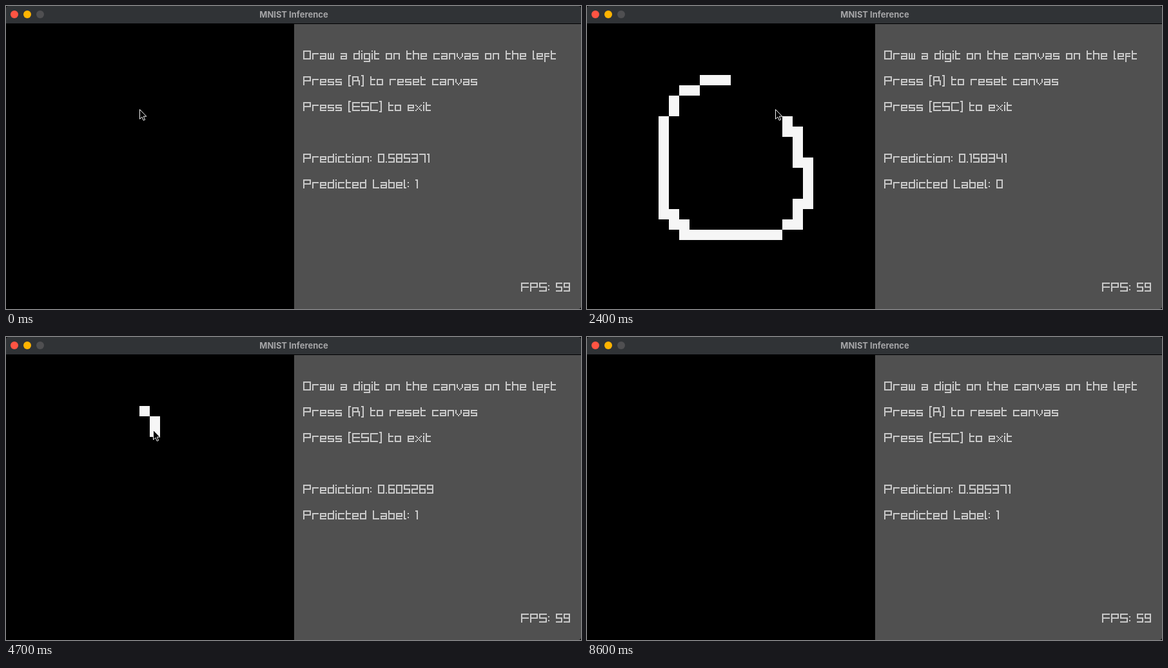
An HTML page for the animation above (8700 ms loop, 892x470 px).

```html
<!DOCTYPE html>
<html lang="en">
<head>
<meta charset="utf-8">
<title>MNIST Inference</title>
<style>
  html, body { margin: 0; width: 100%; height: 100%; overflow: hidden; background: #000; }
  svg { display: block; }
  .title { font: 700 13px Inter, sans-serif; fill: #a6a6a8; text-anchor: middle; }
  .pixels { fill: none; stroke: #c8c8c8; stroke-linecap: square; shape-rendering: crispEdges; }
  .label { font: 20px "DejaVu Sans Mono", monospace; fill: transparent; }
</style>
</head>
<body>
<svg width="892" height="470" viewBox="0 0 892 470">
  <clipPath id="frame"><rect width="892" height="470" rx="4"/></clipPath>
  <g clip-path="url(#frame)">
    <rect width="892" height="27" fill="#303336"/>
    <rect x="447" y="28" width="445" height="442" fill="#505050"/>
    <circle cx="13" cy="13" r="6" fill="#ff5443"/>
    <circle cx="33" cy="13" r="6" fill="#ffb400"/>
    <circle cx="53" cy="13" r="6" fill="#4f4f51"/>
    <text class="title" x="446.5" y="17.5">MNIST Inference</text>
    <path id="ink" fill="#f6f6f6" shape-rendering="crispEdges"/>
    <g id="panel"></g>
    <path id="cursor" d="M.5 .5V15.3L3.9 12.1L6.2 17.4L8.6 16.4L6.3 11.2H10.8Z"
          fill="#000" stroke="#f6f6f6"/>
  </g>
</svg>
<script>
const LOOP = 8700, STEP = 100, CELL = 16;
const $ = id => document.getElementById(id);

// Seven-segment letters: a-g as on a display, h/i rising left/right,
// j/k tail right/left, then dot, middle bar and diagonals
const segments = {
  0: 'abcdef', 1: 'abc', 2: 'abdeg', 3: 'abcdg', 4: 'bcfg',
  5: 'acdfg', 6: 'acdefg', 7: 'abc', 8: 'abcdefg', 9: 'abcdfg',
  C: 'adef', D: 'abcdef', E: 'adefg', F: 'aefg', L: 'def', P: 'abefg', R: 'efR', S: 'acdfg',
  a: 'abcdeg', b: 'abcdefh', c: 'adef', d: 'abcdefi', e: 'abdefg', f: 'aefgk', g: 'abcdefj',
  h: 'abcefh', i: 'ef.', l: 'defh', n: 'abcef', o: 'abcdef', r: 'aef', s: 'acdfg', t: 'adefh',
  v: 'bfv', w: 'bcdef|', x: 'x', '[': 'adef', ']': 'abcd', ':': 'ad', '.': 'd'
};
const narrow = { 1: 1, L: 4, t: 3, f: 3, i: 0, l: 1, '[': 1, ']': 1, ':': 0, '.': 0 };

function glyph(ch) {
  const w = narrow[ch] ?? (/[A-Z]/.test(ch) ? 5 : 4);
  const bracket = /[[\]]/.test(ch);
  const top = bracket ? 0 : /[A-Z0-9]/.test(ch) ? 1 : 3;
  const low = bracket ? 8 : ch === ':' ? 6 : 7;
  const mid = (top + low) / 2;
  const line = (...p) => [p];
  const dot = (x, y) => [x, y, x, y];
  const shapes = {
    a: line(0, top, w, top), b: line(w, top, w, mid), c: line(w, mid, w, low),
    d: line(0, low, w, low), e: line(0, mid, 0, low), f: line(0, top, 0, mid),
    g: line(0, mid, w, mid), h: line(0, 1, 0, top), i: line(w, 1, w, top),
    j: line(w, low, w, 9, 0, 9), k: line(0, low, 0, 9),
    '.': line(0, 1, 0, 1), '|': line(2, top, 2, low),
    R: line(0, 1, 4, 1, 4, 4, 0, 4, 5, 4, 5, 7),
    v: [dot(1, 6), dot(3, 6), dot(2, 7)],
    x: [0, 1, 2, 3, 4].flatMap(i => [dot(i, top + i), dot(i, low - i)])
  };
  return { w, lines: [...segments[ch]].flatMap(s => shapes[s]) };
}

function textPath(text) {
  let x = 0.5, d = '';
  for (const ch of text) {
    if (ch === ' ') { x += 4; continue; }
    const { w, lines } = glyph(ch);
    for (const p of lines) d += 'M' + p.map((v, i) => v + (i % 2 ? 0.5 : x)).join(' ');
    x += w + 2;
  }
  return d;
}

function node(parent, tag, attrs) {
  const el = document.createElementNS('http://www.w3.org/2000/svg', tag);
  for (const key in attrs) el.setAttribute(key, attrs[key]);
  return parent.appendChild(el);
}

// Pixel lettering with a selectable text layer on top
function pixelText(x, y, text = '') {
  const g = node($('panel'), 'g', { transform: `translate(${x} ${y})` });
  const path = node(g, 'path', { class: 'pixels', transform: 'scale(2)' });
  const label = node(g, 'text', { class: 'label', y: 16 });
  const set = value => {
    if (label.textContent === value) return;
    label.textContent = value;
    path.setAttribute('d', textPath(value));
  };
  set(text);
  return set;
}

pixelText(461, 67, 'Draw a digit on the canvas on the left');
pixelText(461, 107, 'Press [R] to reset canvas');
pixelText(461, 147, 'Press [ESC] to exit');
const setScore = pixelText(461, 227);
const setLabel = pixelText(461, 267);
pixelText(799, 427, 'FPS: 59');

// Cells between corners, stepping sideways before up or down; "|" skips a step
function trace(corners) {
  return corners.split(' | ').flatMap(run => {
    const [first, ...rest] = run.split(' ').map(p => p.split(',').map(Number));
    const cells = [first];
    let [x, y] = first;
    for (const [tx, ty] of rest) {
      while (x !== tx || y !== ty) {
        if (x !== tx) cells.push([x += Math.sign(tx - x), y]);
        if (y !== ty) cells.push([x, y += Math.sign(ty - y)]);
      }
    }
    return cells;
  });
}

// lead: how many cells the pointer is ahead of the ink
const strokes = [
  {
    cells: trace('13,5 11,5 | 10,6 9,6 | 8,7 8,8 | 7,9 7,18 9,20 18,20 | ' +
      '19,19 20,19 20,17 21,17 21,13 20,10 19,9 | 18,8 | 17,7 15,5 13,5'),
    start: 600, end: 2700, reset: 3600, lead: 1, digit: 0,
    score: [[600, 0.585371], [1700, 0.331119], [2700, 0.084294]]
  },
  {
    cells: trace('13,5 | 14,6 14,14 15,21'),
    start: 4400, end: 6000, reset: 6600, lead: 0, digit: 1,
    score: [[4400, 0.585371], [4700, 0.605269], [6000, 0.973177]]
  }
];

// Pointer between strokes: time, x, y
const hand = [[0, 207, 160], [600, 212, 112], [2700, 212, 112], [2800, 206, 112],
  [4400, 206, 112], [6000, 243, 363], [7000, 241, 361], [7500, 241, 361], [8200, 470, -30]];

function along(keys, t) {
  const i = keys.findIndex(k => k[0] > t);
  if (i < 0) return keys[keys.length - 1].slice(1);
  const [t0, ...a] = keys[Math.max(i - 1, 0)], [t1, ...b] = keys[i];
  return a.map((v, n) => v + (b[n] - v) * (t - t0) / (t1 - t0));
}

function draw(t) {
  const s = strokes.find(s => t >= s.start && t < s.reset);
  let cells = [], value = 0.585371, digit = 1, [x, y] = along(hand, t);
  if (s) {
    const p = Math.min((t - s.start) / (s.end - s.start), 1);
    const count = Math.round(p * s.cells.length);
    cells = s.cells.slice(0, count);
    [value] = along(s.score, t);
    if (p > 0.25) digit = s.digit;
    if (p < 1) {
      const [c, r] = s.cells[Math.min(Math.max(count - 1 + s.lead, 0), s.cells.length - 1)];
      [x, y] = [c * CELL + 4, r * CELL + 32];
    }
  }
  $('ink').setAttribute('d', cells.map(([c, r]) =>
    `M${c * CELL - 1} ${r * CELL + 27}h16v16h-16z`).join(''));
  setScore('Prediction: ' + value.toFixed(6));
  setLabel('Predicted Label: ' + digit);
  $('cursor').setAttribute('transform', `translate(${Math.round(x)} ${Math.round(y)})`);
}

function tick() {
  draw(Math.floor(performance.now() % LOOP / STEP) * STEP);
  requestAnimationFrame(tick);
}
tick();
</script>
</body>
</html>
```
